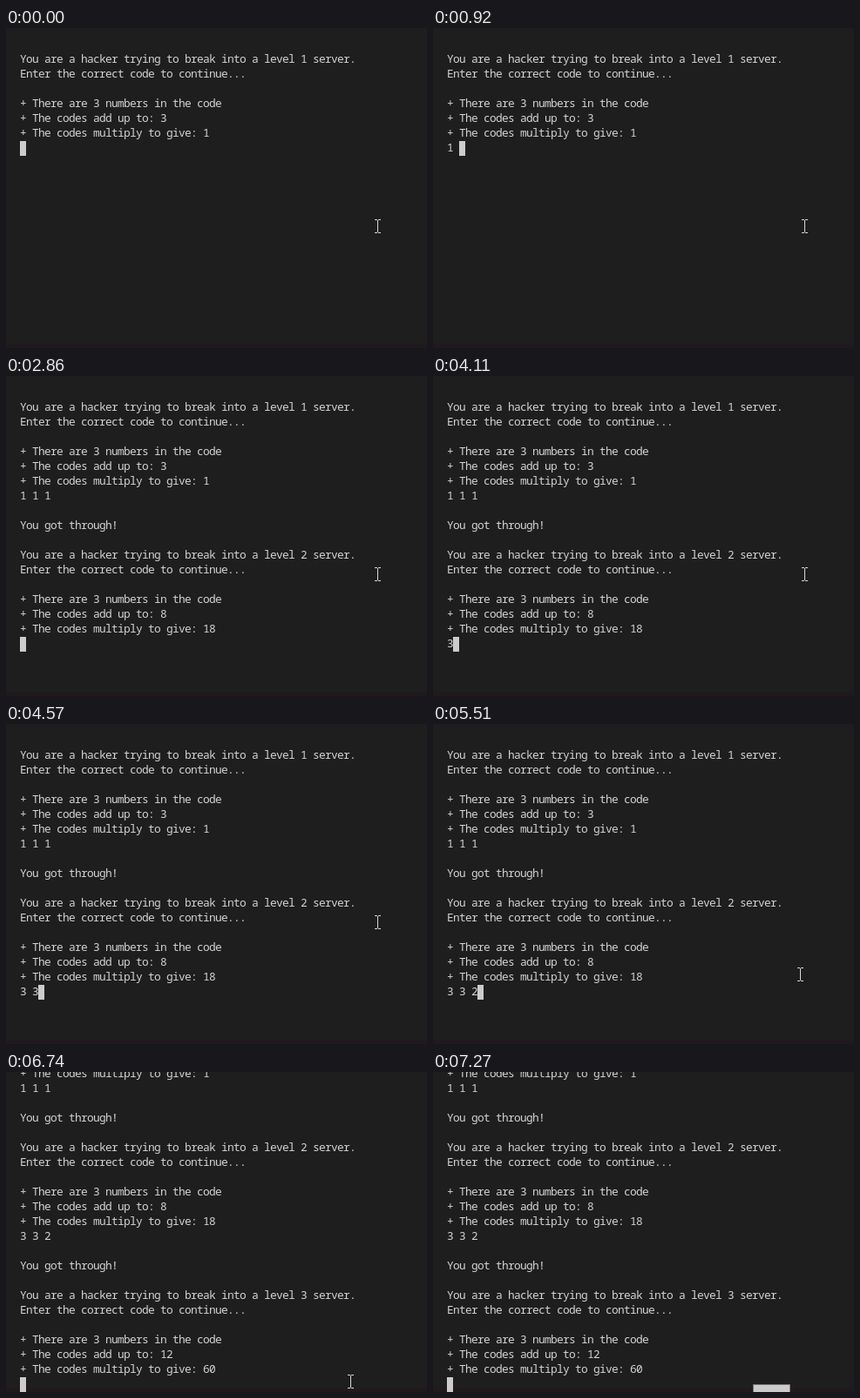
Recreate the animation shown at these times as an HTML page. Size 483 by 368 pixels, loop 7370 ms.

```html
<!DOCTYPE html>
<html lang="en">
<head>
<meta charset="utf-8">
<title>Code breaker</title>
<style>
  html, body { margin: 0; width: 100%; height: 100%; overflow: hidden; background: #1e1e1e; }
  svg { display: block; width: 483px; height: 368px; }
  text {
    font: 500 12.8px "Noto Sans Mono", "DejaVu Sans Mono", monospace;
    letter-spacing: calc(7px - 0.6em);
    fill: #d4d4d4;
    white-space: pre;
    font-variant-ligatures: none;
  }
</style>
</head>
<body>
<svg viewBox="0 0 483 368">
  <rect width="483" height="368" fill="#1e1e1e"/>
  <rect y="364" width="483" height="4" fill="#21191d"/>
  <g id="lines"></g>
  <rect id="caret" width="7" height="17" fill="#cccccc"/>
  <path id="pointer" d="M-3 -7.5H0M1 -7.5H4M.5 -7V7M-3 7.5H0M1 7.5H4" stroke="#d8d8d8" fill="none"/>
  <rect id="tip" x="367.5" y="359.5" width="42" height="12" fill="#cbcbcb" stroke="#777"/>
</svg>
<script>
const LOOP = 7370, LEFT = 16, TOP = 28, ROW = 17, COL = 7, BLOCK = 10;
const byId = id => document.getElementById(id);
const lines = byId('lines'), caret = byId('caret'), pointer = byId('pointer'), tip = byId('tip');

const levels = [
  { start: 0, sum: 3, product: 1, answer: '1 1 1', keys: [550, 920, 1160, 1470, 1860] },
  { start: 2860, sum: 8, product: 18, answer: '3 3 2', keys: [4110, 4340, 4570, 4800, 4970] },
  { start: 6040, sum: 12, product: 60, answer: '', keys: [] }
];

function addLine(group, row, text) {
  const el = document.createElementNS('http://www.w3.org/2000/svg', 'text');
  el.setAttribute('x', LEFT);
  el.setAttribute('y', TOP + row * ROW + 12);
  el.textContent = text;
  group.appendChild(el);
  return el;
}

levels.forEach((level, i) => {
  level.group = document.createElementNS('http://www.w3.org/2000/svg', 'g');
  const row = i * BLOCK;
  const add = (offset, text) => addLine(level.group, row + offset, text);
  if (i) add(-2, 'You got through!');
  add(0, `You are a hacker trying to break into a level ${i + 1} server.`);
  add(1, 'Enter the correct code to continue...');
  add(3, '+ There are 3 numbers in the code');
  add(4, `+ The codes add up to: ${level.sum}`);
  add(5, `+ The codes multiply to give: ${level.product}`);
  level.input = add(6, '');
  lines.appendChild(level.group);
});

// Mouse moves are sampled in even steps; a null place means it has left the stage.
const moves = [
  { from: 5350, to: 5510, path: [[425, 246], [422, 276], [421, 288]] },
  { from: 6350, to: 6810, path: [[420, 292], [416, 303], [410, 319], [403, 335], [398, 347], [395, 356], null] }
];

function pointerAt(t) {
  let place = [426, 228];
  for (const { from, to, path } of moves) {
    if (t < from) break;
    const last = path.length - 1;
    const step = Math.floor((t - from) / (to - from) * last + 0.04);
    place = path[Math.min(last, step)];
  }
  return place;
}

const show = (el, on) => el.setAttribute('visibility', on ? 'visible' : 'hidden');

function draw(t) {
  let current = 0, typed = 0;
  levels.forEach((level, i) => {
    show(level.group, t >= level.start);
    const count = level.keys.filter(k => t >= k).length;
    level.input.textContent = level.answer.slice(0, count);
    if (t >= level.start) {
      current = i;
      typed = count;
    }
  });

  const scroll = current === 2 ? 7 * ROW : 0;
  lines.setAttribute('transform', `translate(0 ${-scroll})`);
  caret.setAttribute('x', LEFT + typed * COL);
  caret.setAttribute('y', TOP + (current * BLOCK + 6) * ROW - scroll);

  const place = pointerAt(t);
  show(pointer, place);
  if (place) pointer.setAttribute('transform', `translate(${place})`);

  show(tip, t >= 7200);
  tip.setAttribute('opacity', t < 7270 ? 0.5 : 1);
}

const origin = performance.now();
function tick() {
  draw((performance.now() - origin) % LOOP);
  requestAnimationFrame(tick);
}
tick();
</script>
</body>
</html>
```
